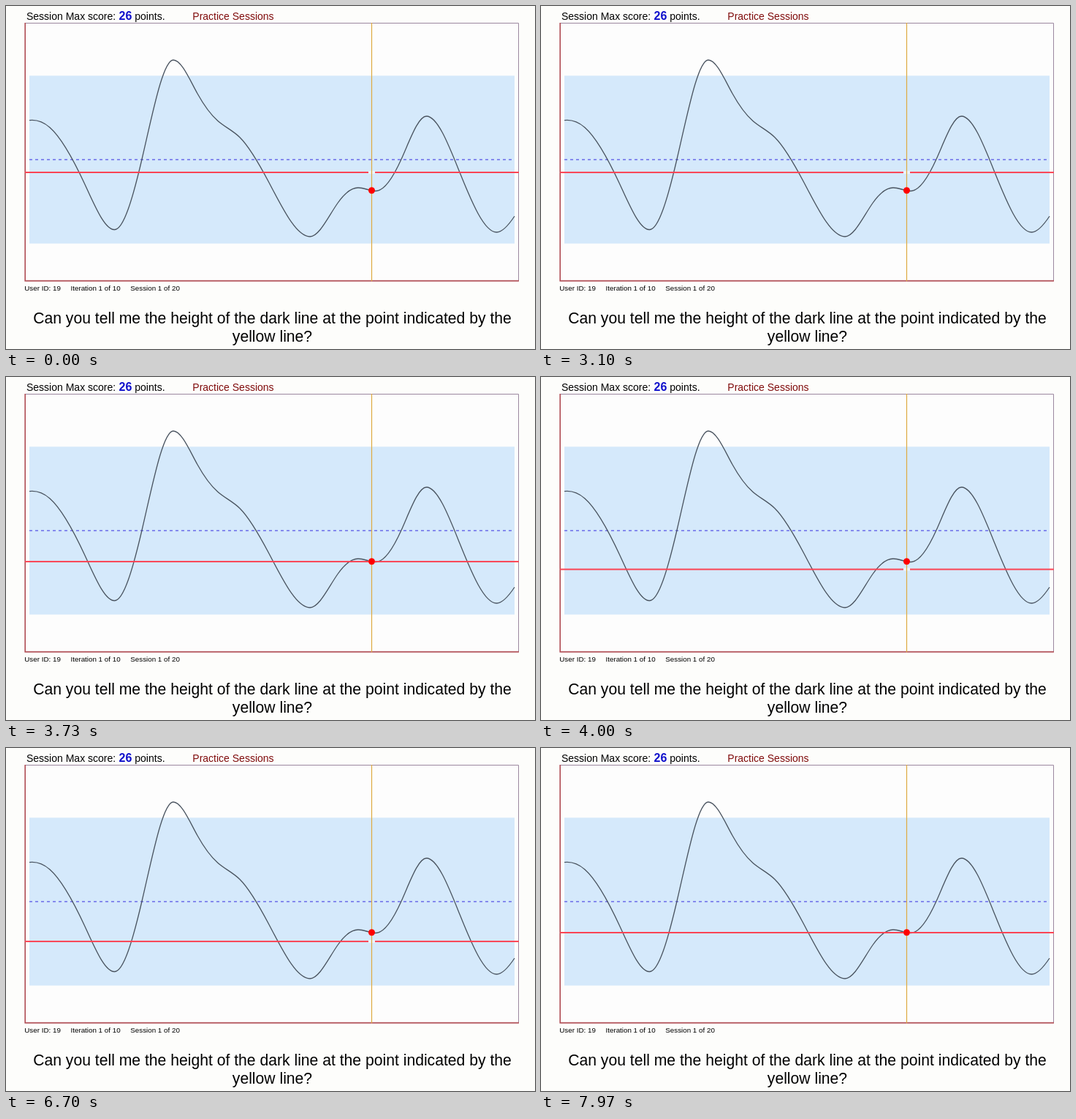
An HTML page for the animation above (8 s loop, 724 px wide and 470 px high).

```html
<!DOCTYPE html>
<html lang="en">
<head>
<meta charset="utf-8">
<title>Height estimation task</title>
<style>
  html, body { margin: 0; width: 100%; height: 100%; overflow: hidden; background: #fdfdfb; }
  svg { display: block; width: 724px; height: 470px; font-family: "Liberation Sans", Arial, sans-serif; }
  .head { font-size: 14px; }
  .foot { font-size: 9.8px; }
  .question { font-size: 21.15px; text-anchor: middle; }
  #level { animation: level 8s linear infinite; }
  @keyframes level {
    0%, 38.75% { transform: translateY(0); }
    50% { transform: translateY(35.5px); animation-timing-function: cubic-bezier(.33, .6, .67, 1); }
    54.4% { transform: translateY(43px); }
    66%, 80.4% { transform: translateY(39.6px); }
    99.6%, 100% { transform: translateY(25px); }
  }
</style>
</head>
<body>
<svg viewBox="0 0 724 470">
  <g class="head">
    <text x="28" y="19">Session Max score:</text>
    <text x="154.5" y="19" font-size="16" font-weight="bold" fill="#1010cc">26</text>
    <text x="176.3" y="19">points.</text>
    <text x="255.3" y="19" fill="#800c0c">Practice Sessions</text>
  </g>

  <rect x="26" y="23" width="676" height="354" fill="#fdfdfd"/>
  <rect x="32" y="95.5" width="664" height="230" fill="#d5e9fb"/>
  <path d="M26 23.5H701.5V377" fill="none" stroke="#9c88a0"/>
  <path d="M26.2 23V376.6H702" fill="none" stroke="#b04c54" stroke-width="1.6"/>
  <path d="M32 210.5H696" stroke="#6868e8" stroke-width="1.4" stroke-dasharray="4 4"/>
  <path id="curve" fill="none" stroke="#4a5460" stroke-width="1.3"/>

  <g id="level">
    <path d="M496 228H505" stroke="#ecf4fb" stroke-width="4"/>
    <path d="M26 228H496M505 228H702" stroke="#fa4454" stroke-width="2.2"/>
  </g>

  <path d="M500.5 23V377" stroke="#deaa40" stroke-width="1.2"/>
  <circle cx="500.5" cy="252.7" r="4.5" fill="#f00"/>

  <g class="foot">
    <text x="25.3" y="390">User ID: 19</text>
    <text x="88.5" y="390">Iteration 1 of 10</text>
    <text x="170.3" y="390">Session 1 of 20</text>
  </g>
  <g class="question">
    <text x="364.5" y="434.5">Can you tell me the height of the dark line at the point indicated by the</text>
    <text x="364.5" y="459.5">yellow line?</text>
  </g>
</svg>
<script>
  // Turning points of the curve and a few points between them.
  const keys = [
    [32, 156.7], [60, 166.5], [108, 244.5], [148.5, 306.5], [186, 210], [229, 74],
    [262, 120], [290, 157.5], [320, 180], [360, 242], [416, 316], [454, 270],
    [482, 249], [506, 253.5], [541, 210], [575.5, 151], [621, 228], [671.5, 310], [696, 288]
  ];

  // Cubic spline: flat at turning points, continuous curvature elsewhere.
  function splinePath(pts, startSlope, endSlope) {
    const last = pts.length - 1;
    const step = i => pts[i + 1][0] - pts[i][0];
    const rise = i => (pts[i + 1][1] - pts[i][1]) / step(i);
    const slope = pts.map(() => 0);
    slope[0] = startSlope;
    slope[last] = endSlope;
    for (let pass = 0; pass < 30; pass++) {
      for (let i = 1; i < last; i++) {
        if (rise(i - 1) * rise(i) <= 0) continue;
        const a = step(i - 1), b = step(i);
        const pull = (3 * rise(i - 1) - slope[i - 1]) / a + (3 * rise(i) - slope[i + 1]) / b;
        slope[i] = pull / (2 / a + 2 / b);
      }
    }
    let d = `M${pts[0]}`;
    for (let i = 0; i < last; i++) {
      const [x, y] = pts[i], [u, v] = pts[i + 1], h = step(i) / 3;
      d += `C${x + h},${y + slope[i] * h} ${u - h},${v - slope[i + 1] * h} ${u},${v}`;
    }
    return d;
  }

  document.getElementById('curve').setAttribute('d', splinePath(keys, -0.12, -1.5));
</script>
</body>
</html>
```
